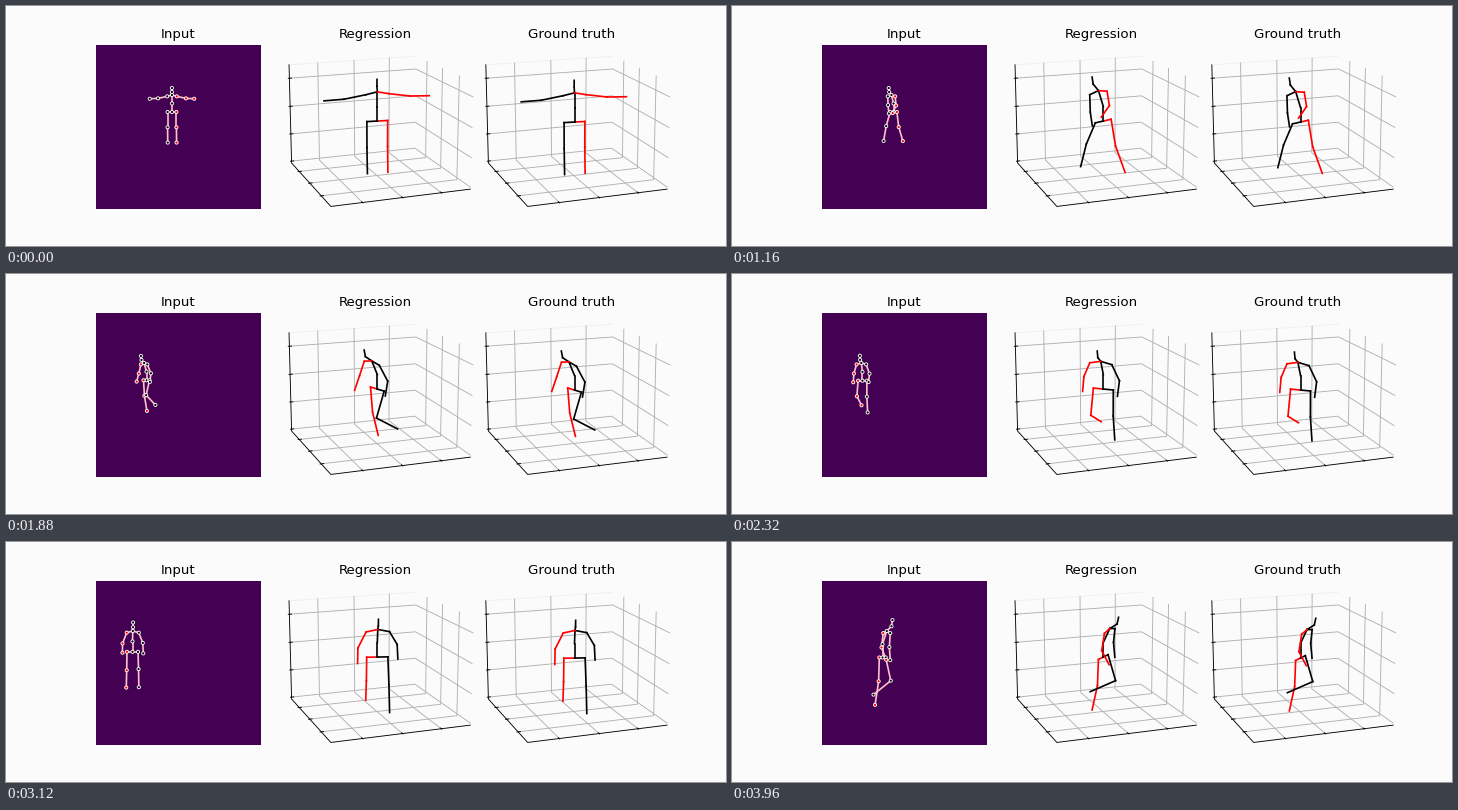
Recreate the animation shown at these times as a matplotlib script. Size 720 by 240 pixels, loop 4000 ms.

```python
import numpy as np
import matplotlib.pyplot as plt
from matplotlib.animation import FuncAnimation

W, H, DPI = 720, 240, 80
FRAMES, STEP = 100, 40
GAP = 196.8            # distance between neighbouring panels
CX, CY = 370.9, 119.1  # projection centre of the middle panel
SCALE = 890
PAPER, GRID = "#fbfbfb", "#b0b0b0"

# Joint order: root, right leg, left leg, spine to head, left arm, right arm
PARENT = [-1, 0, 1, 2, 0, 4, 5, 0, 7, 8, 9, 8, 11, 12, 8, 14, 15]
RIGHT = {1, 2, 3, 14, 15, 16}

# Bone lengths in metres
HIP, THIGH, SHIN, SHOULDER, UPPER, FORE = .133, .45, .45, .145, .28, .25
PELVIS = .92           # height of the root above the floor

# The walk: heading (0 faces away), arm raise, image x, image pixels per metre
TIMES = [0, 520, 1160, 1880, 2800, 3440, 3960]
HEADING = [12, 14, 42, 130, 178, 194, 243]
RAISE = [78, 55, 14, 18, 22, 20, 15]
IMAGE_X = [166, 167, 161.5, 140.5, 125, 132, 150.5]
SIZE = [34, 34, 34, 34.5, 38, 46, 53]

# Gait cycles done by the left leg
STRIDE_T = [600, 1160, 1860, 2810, 3950]
STRIDE_N = [-.55, .03, .75, 1.75, 2.75]


def smooth(t, values):
    """Smooth curve through values at TIMES."""
    ts, v = np.array(TIMES, float), np.array(values, float)
    m = np.gradient(v, ts)
    m[0] = 0
    k = int(np.clip(np.searchsorted(ts, t, "right") - 1, 0, len(ts) - 2))
    h = ts[k + 1] - ts[k]
    s = (t - ts[k]) / h
    return (v[k] + s * s * (3 - 2 * s) * (v[k + 1] - v[k])
            + h * s * (1 - s) * ((1 - s) * m[k] - s * m[k + 1]))


def ease(t, t0, t1):
    s = np.clip((t - t0) / (t1 - t0), 0, 1)
    return s * s * (3 - 2 * s)


def bone(length, swing, spread=0):
    """Hanging bone as (outward, forward, up); angles in degrees."""
    f, o = np.radians([swing, spread])
    return length * np.array([np.sin(o), np.cos(o) * np.sin(f), -np.cos(o) * np.cos(f)])


def chain(start, side, *parts):
    """Joints of a limb; side is 1 for right and -1 for left."""
    pts = [np.array(start, float)]
    for part in parts:
        pts.append(pts[-1] + part * (side, 1, 1))
    return pts


def leg(side, phase, pace):
    swing = pace * (6 + 20 * np.cos(phase + .4))
    bend = 3 + pace * (5 + 60 * max(0, -np.sin(phase)) ** 1.5)
    return chain((side * HIP, 0, 0), side, bone(THIGH, swing), bone(SHIN, swing - bend))


def arm(side, neck, phase, pace, lift):
    swing = pace * (15 * np.cos(phase + .4) - 6)
    return chain(neck + (side * SHOULDER, 0, -.04), side, bone(UPPER, swing, lift),
                 bone(FORE, swing + 20, 1.5 * lift - 30))


def skeleton(t):
    """Joints around the root as (screen side, toward the viewer, up)."""
    pace = ease(t, 560, 1120)
    left = 2 * np.pi * np.interp(t, STRIDE_T, STRIDE_N)
    right = left + np.pi
    lift = smooth(t, RAISE)
    neck = np.array([0, .09 * pace, .5])
    nose = neck + (0, .02 + .08 * pace, .09)
    trunk = [(0, 0, .25), neck, nose, nose + (0, .02 * pace, .115)]
    local = np.array([(0, 0, 0), *leg(1, right, pace), *leg(-1, left, pace), *trunk,
                      *arm(-1, neck, right, pace, lift), *arm(1, neck, left, pace, lift)])
    a = np.radians(smooth(t, HEADING))
    x, y, z = local.T
    return np.array([x * np.cos(a) - y * np.sin(a), -x * np.sin(a) - y * np.cos(a), z])


AZ, EL = np.radians(70), np.radians(15)


def project(side, near, z, dx=0):
    """Perspective view of metres, in stage pixels."""
    side, near, up = side * .6723, near * .6723, (z - .85) * .5042
    w = 7.5 - near * np.cos(EL) - up * np.sin(EL)
    v = up * np.cos(EL) - near * np.sin(EL)
    return np.array([CX + dx + SCALE * side / w, CY - SCALE * v / w])


def poses(t):
    """Joints of the image, the regression and the ground truth at time t."""
    side, near, z = skeleton(t)
    size = smooth(t, SIZE)
    image = np.array([smooth(t, IMAGE_X) + size * side, 89 + size * (.5 - z)])
    reg = project(side, near, z + PELVIS, .4)
    true = reg + np.array([[GAP + .4], [1]])
    return image.T, reg.T, true.T


fig = plt.figure(figsize=(W / DPI, H / DPI), dpi=DPI, facecolor=PAPER)
ax = fig.add_axes([0, 0, 1, 1])
ax.set_xlim(0, W)
ax.set_ylim(H, 0)
ax.axis("off")


def path(dx, color, *points):
    x, y, z = np.array(points).T
    side = -np.sin(AZ) * x + np.cos(AZ) * y
    near = np.cos(AZ) * x + np.sin(AZ) * y
    ax.plot(*project(side, near, z, dx), color=color, lw=.8,
            zorder=2 if color == "black" else 1)


def room(dx):
    e, lo, hi = .8854, -.0354, 1.7354   # box limits
    out, inn = e + .0148, e - .0295     # tick ends
    path(dx, "#f0f0f0", (e, -e, hi), (-e, -e, hi))
    for v in (-.5, 0, .5):
        path(dx, GRID, (v, e, lo), (v, -e, lo), (v, -e, hi))
        path(dx, GRID, (e, v, lo), (-e, v, lo), (-e, v, hi))
        path(dx, "black", (v, out, lo), (v, inn, lo))
        path(dx, "black", (out, v, lo), (inn, v, lo))
    for v in (0, .5, 1, 1.5):
        path(dx, GRID, (e, -e, v), (-e, -e, v), (-e, e, v))
        path(dx, "black", (out, -e, v), (inn, -e, v))
    path(dx, "black", (e, -e, hi), (e, -e, lo), (e, e, lo), (-e, e, lo))


def side_color(j):
    return "red" if j in RIGHT else "black"


def bones(color):
    return [ax.plot([], [], color=color(j), lw=1.5, zorder=3)[0] for j in range(1, 17)]


for i, title in enumerate(("Input", "Regression", "Ground truth")):
    ax.text(172.2 + GAP * i, 32.3, title, fontsize=12, family="DejaVu Sans",
            ha="center", va="baseline")
ax.add_patch(plt.Rectangle((90, 39), 165, 164, fc="#440154", lw=0))
room(0)
room(GAP)

figures = [bones(lambda j: "pink"), bones(side_color), bones(side_color)]
dots = ax.scatter(np.zeros(17), np.zeros(17), 8, c=[side_color(j) for j in range(17)],
                  edgecolors="white", linewidths=.8, zorder=10)


def draw(i):
    joints = poses(i * STEP)
    for lines, pts in zip(figures, joints):
        for j, line in enumerate(lines, 1):
            line.set_data(*pts[[j, PARENT[j]]].T)
    dots.set_offsets(joints[0])
    return [dots, *sum(figures, [])]


anim = FuncAnimation(fig, draw, frames=FRAMES, interval=STEP, repeat=True, repeat_delay=0)
plt.show()
```
